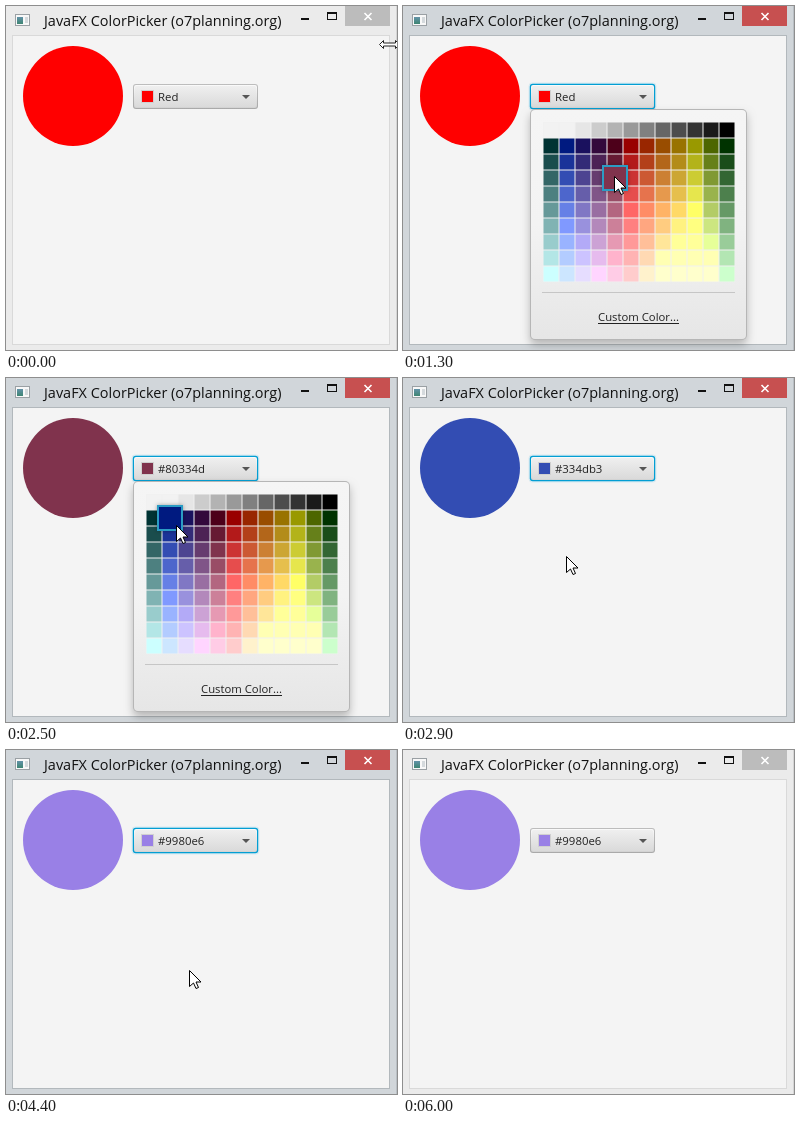
Write an HTML page with a canvas that moves like this. It is 391 px wide and 344 px high and loops after 6.1 s.

```html
<!DOCTYPE html>
<html lang="en">
<head>
<meta charset="utf-8">
<title>Color picker</title>
<style>
  html, body { margin: 0; width: 100%; height: 100%; overflow: hidden; background: #ebebeb; }
  canvas { display: block; }
</style>
</head>
<body>
<canvas id="stage" width="391" height="344"></canvas>
<script>
const ctx = document.getElementById('stage').getContext('2d');
const LOOP = 6100, STEP = 100;
const FONT = '"Open Sans", "Noto Sans", sans-serif';
const GRID = { x: 140, y: 116, cell: 16, cols: 12, rows: 10 };

const PICKS = [
  { open: 700, close: 1500, color: '#80334d' },
  { open: 2300, close: 2900, color: '#334db3' },
  { open: 3600, close: 4400, color: '#9980e6' }
];

// Where the pointer rests or turns
const STOPS = [
  { from: 100, to: 100, x: 358, y: 47 },
  { from: 700, to: 700, x: 229, y: 86 },
  { from: 1300, to: 1500, x: 212, y: 171 },
  { from: 2100, to: 2200, x: 184, y: 92 },
  { from: 2700, to: 2900, x: 164, y: 179 },
  { from: 3500, to: 3500, x: 201, y: 92 },
  { from: 3600, to: 3600, x: 203, y: 135 },
  { from: 4100, to: 4700, x: 184, y: 221 },
  { from: 4900, to: 4900, x: 231, y: 150 },
  { from: 5200, to: 5200, x: 112, y: 89 },
  { from: 5400, to: 5400, x: 168, y: 107 },
  { from: 5600, to: 5600, x: 395, y: 83 }
];

// Darkest tones across the palette, in tenths of full intensity
const TONES = [
  { col: 0, rgb: [0, 2, 2] },
  { col: 1, rgb: [0, 1, 5] },
  { col: 4, rgb: [3, 0, 1] },
  { col: 5, rgb: [6, 0, 0] },
  { col: 9, rgb: [6, 6, 0] },
  { col: 11, rgb: [0, 2, 0] }
];

const mix = (a, b, k) => a + (b - a) * k;
const smooth = k => k * k * (3 - 2 * k);

function swatch(col, row) {
  if (row === 0) {
    const gray = Math.min(242, Math.round((11 - col) * 25.5));
    return `rgb(${gray},${gray},${gray})`;
  }
  const i = Math.max(1, TONES.findIndex(s => s.col >= col));
  const a = TONES[i - 1], b = TONES[i];
  const k = (col - a.col) / (b.col - a.col);
  const rgb = a.rgb.map((v, n) => {
    const level = Math.min(10, mix(v, b.rgb[n], k) + row - 1);
    return Math.round(level * 25.5);
  });
  return `rgb(${rgb})`;
}

function pointerAt(t) {
  const i = STOPS.findIndex(s => t <= s.to);
  if (i < 0) return null;
  const b = STOPS[i], a = STOPS[i - 1];
  if (!a || t >= b.from) return b;
  const k = smooth((t - a.to) / (b.from - a.to));
  return { x: Math.round(mix(a.x, b.x, k)), y: Math.round(mix(a.y, b.y, k)) };
}

function rect(x, y, w, h, fill) {
  ctx.fillStyle = fill;
  ctx.fillRect(x, y, w, h);
}

function round(x, y, w, h, r, fill) {
  ctx.beginPath();
  ctx.roundRect(x, y, w, h, r);
  ctx.fillStyle = fill;
  ctx.fill();
}

function poly(points, fill, stroke) {
  ctx.beginPath();
  points.forEach(([x, y]) => ctx.lineTo(x, y));
  ctx.closePath();
  ctx.fillStyle = fill;
  ctx.fill();
  if (stroke) {
    ctx.strokeStyle = stroke;
    ctx.lineWidth = 1;
    ctx.stroke();
  }
}

function fade(y0, y1, ...colors) {
  const g = ctx.createLinearGradient(0, y0, 0, y1);
  colors.forEach((c, i) => g.addColorStop(i / (colors.length - 1), c));
  return g;
}

function text(str, x, y, size, color) {
  ctx.font = `${size}px ${FONT}`;
  ctx.fillStyle = color;
  ctx.fillText(str, x, y);
}

function drawWindow(active) {
  const frame = active ? '#d1d6da' : '#ebebeb';
  rect(0, 0, 391, 344, frame);
  rect(390, 0, 1, 344, active ? '#b9bfc4' : '#d5d5d5');
  rect(6, 29, 378, 310, active ? '#b2b8bc' : '#d9d9d9');
  rect(7, 30, 376, 308, '#f4f4f4');

  rect(9, 8, 15, 12, '#9aa0a4');
  rect(10, 9, 13, 10, '#f8f8f8');
  rect(11, 11, 6, 7, fade(11, 18, '#6292a8', '#3e8572'));
  rect(19, 11, 3, 6, '#d5dadd');

  text('JavaFX ColorPicker (o7planning.org)', 38, 20, 14.45, '#111');

  rect(295, 12, 8, 2, '#111');
  rect(321, 6, 10, 8, '#111');
  rect(322, 8, 8, 5, frame);
  rect(339, 0, 45, 20, active ? '#c75050' : '#bcbcbc');
  ctx.strokeStyle = '#fff';
  ctx.lineWidth = 1.6;
  ctx.beginPath();
  for (const side of [-1, 1]) {
    ctx.moveTo(362 - 3.5 * side, 7);
    ctx.lineTo(362 + 3.5 * side, 14);
  }
  ctx.stroke();
}

function drawCircle(color) {
  ctx.beginPath();
  ctx.arc(67, 90, 50, 0, Math.PI * 2);
  ctx.fillStyle = color;
  ctx.fill();
}

function drawButton(color, label, focused) {
  const layer = (inset, r, fill) =>
    round(127 + inset, 78 + inset, 125 - 2 * inset, 25 - 2 * inset, r, fill);
  if (focused) {
    layer(-1.4, 4, 'rgba(3,158,211,.13)');
    layer(-.2, 3, '#039ed3');
  } else {
    layer(0, 3, fade(78, 103, '#bdbdbd', '#a9a9a9'));
  }
  layer(1, 2, fade(79, 102, '#fafafa', '#d2d2d2'));
  layer(2, 1.5, fade(80, 101, '#efefef', '#dadada'));
  rect(135, 84, 13, 13, '#d0d0d0');
  rect(136, 85, 11, 11, color);
  text(label, 152, 95, 11.4, '#222');
  poly([[236, 89], [244, 89], [240, 93]], '#555');
}

function drawHover(pos) {
  const { x, y, cell, cols, rows } = GRID;
  const col = Math.floor((pos.x - x) / cell);
  const row = Math.floor((pos.y - y - 4) / cell);
  if (col < 0 || col >= cols || row < 0 || row >= rows) return;
  const left = x + col * cell - 5, top = y + row * cell - 5;
  ctx.save();
  ctx.shadowColor = 'rgba(0,0,0,.35)';
  ctx.shadowBlur = 4;
  rect(left, top, 26, 26, '#2b9cc4');
  ctx.restore();
  rect(left + 2, top + 2, 22, 22, swatch(col, row));
}

function drawPopup(pos) {
  ctx.save();
  ctx.shadowColor = 'rgba(0,0,0,.25)';
  ctx.shadowBlur = 9;
  ctx.shadowOffsetY = 5;
  round(127, 103, 217, 231, 5, '#b6b6b6');
  ctx.restore();
  round(128, 104, 215, 229, 4, fade(104, 333, '#f5f5f5', '#f3f3f3', '#e6e6e6'));

  const { x, y, cell, cols, rows } = GRID;
  rect(x, y, cell * cols, cell * rows, '#f1f1f1');
  for (let row = 0; row < rows; row++) {
    for (let col = 0; col < cols; col++) {
      rect(x + col * cell + .5, y + row * cell + .5, cell - 1, cell - 1, swatch(col, row));
    }
  }
  rect(139, 286, 193, 1, '#c6c6c6');
  text('Custom Color...', 195, 315, 11.3, '#222');
  rect(195, 317, 81, 1, '#222');
  drawHover(pos);
}

function drawPointer({ x, y }) {
  ctx.save();
  ctx.translate(x - .5, y - .5);
  poly([[0, 0], [0, 16], [4, 12.5], [6.5, 18], [9, 17], [6.5, 11.5], [11.5, 11.5]], '#fff', '#000');
  ctx.restore();
}

function drawResizer() {
  const half = [[-10, 0], [-6, -4], [-6, -1.5], [6, -1.5], [6, -4], [10, 0]];
  const back = half.map(([x, y]) => [-x, -y]);
  ctx.save();
  ctx.translate(383.5, 38.5);
  poly([...half, ...back], '#fff', '#222');
  ctx.restore();
}

function draw(t) {
  const active = t >= 600 && t < 6000;
  const picked = PICKS.findLast(p => t >= p.close);
  const opened = PICKS.some(p => t >= p.open && t < p.close);
  const color = picked ? picked.color : '#ff0000';
  const pos = pointerAt(t);
  drawWindow(active);
  drawCircle(color);
  drawButton(color, picked ? color : 'Red', active);
  if (opened) drawPopup(pos);
  if (t < 100) drawResizer();
  else if (pos) drawPointer(pos);
}

const start = performance.now();
function tick() {
  const t = (performance.now() - start) % LOOP;
  draw(Math.floor(t / STEP) * STEP);
  requestAnimationFrame(tick);
}
tick();
</script>
</body>
</html>
```
